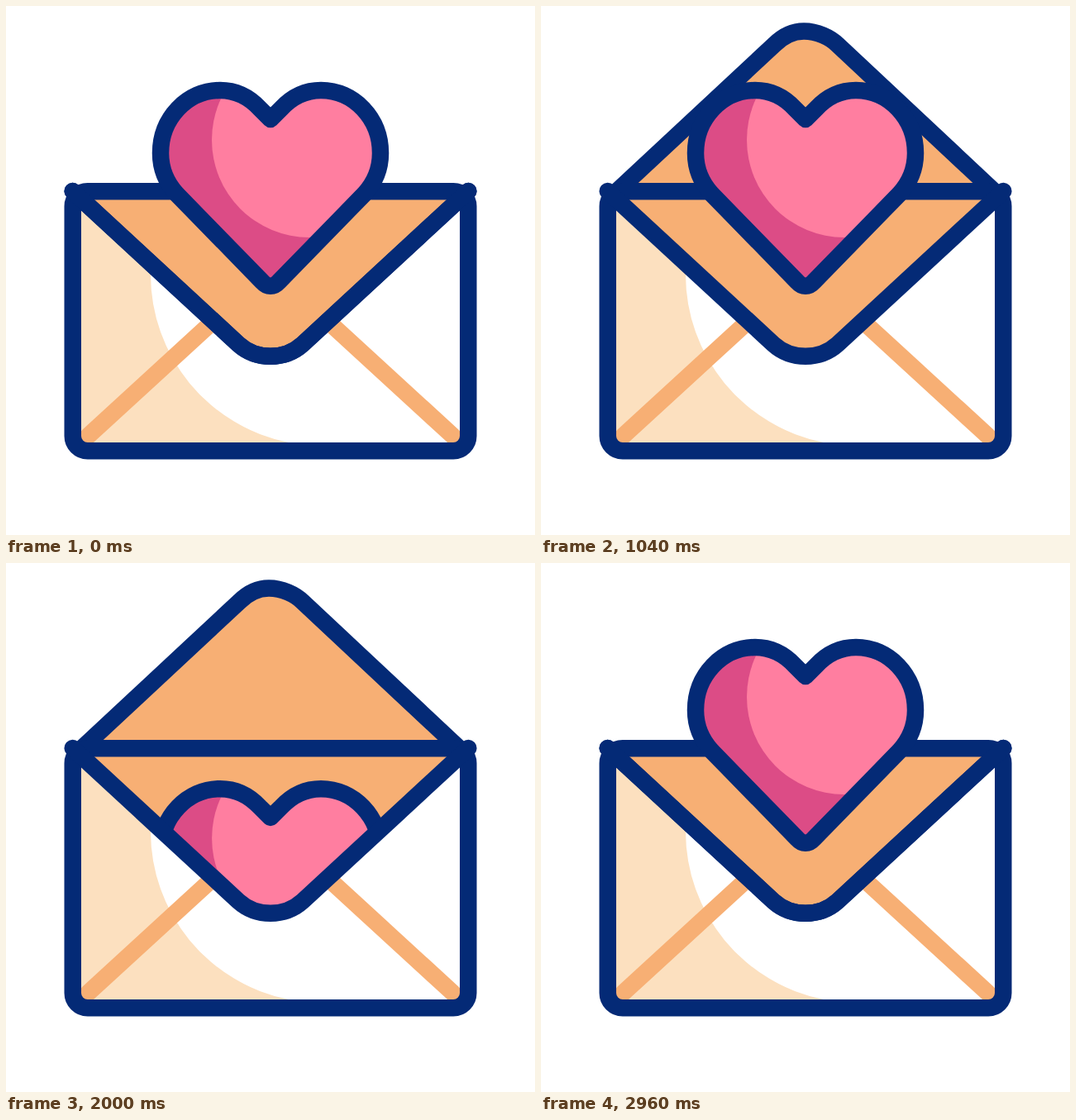
An HTML page for the animation above (3 s loop, 640 px wide and 640 px high).

```html
<!DOCTYPE html>
<html lang="en">
<head>
<meta charset="utf-8">
<title>Love letter</title>
<style>
  html, body { margin: 0; width: 100%; height: 100%; overflow: hidden; background: #fff; }
  svg { display: block; width: 100vw; height: 100vh; }

  .line { fill: none; stroke: #042a76; stroke-width: 20.5; stroke-linecap: round; stroke-linejoin: round; }
  .orange { fill: #f7af74; }
  .fold { fill: none; stroke: #f7af74; stroke-width: 20.5; stroke-linecap: round; }

  .flap { fill: #f7af74; animation: flap 3s infinite ease-in-out; }
  .heart {
    transform-box: view-box;
    transform-origin: 320px 220px;
    animation: drop 3s infinite ease-in-out, tilt 3s infinite ease-in-out, beat 3s infinite ease-in-out;
  }

  @keyframes flap {
    0%, 13.333%, 98.667%, 100% {
      d: path("M80.7 224 L281 409 C292 419 306 423.8 320 423.8 C334 423.8 348 419 359 409 L559.3 224");
    }
    28.8% {
      d: path("M92 224 L282 43 C292 33 304 27 318 27 C334 27 350 34.5 359 43 L548 224");
    }
    33.333%, 88% {
      d: path("M92 224 L282 47 C292 37 304 30.5 318 30.5 C334 30.5 350 38 359 47 L548 224");
    }
  }
  @keyframes drop {
    0%, 35.7% { translate: 0 0; }
    56%, 77.333% { translate: 0 171px; }
    86.333%, 100% { translate: 0 0; }
  }
  @keyframes tilt {
    0%, 36% { rotate: 0deg; }
    44% { rotate: -8.6deg; }
    56%, 100% { rotate: 0deg; }
  }
  @keyframes beat {
    0%, 6.667% { scale: 1; }
    12.667% { scale: 1.045; }
    18.667%, 52% { scale: 1; }
    57.333% { scale: .955; }
    68%, 100% { scale: 1; }
  }
</style>
</head>
<body>
<svg viewBox="0 0 640 640">
  <defs>
    <path id="vee" d="M80.7 224 L281 409 C292 419 306 423.8 320 423.8 C334 423.8 348 419 359 409 L559.3 224"/>
    <path id="shape" d="M320 137 L307 124 C294 110 277 102 259 102 C219 102 187 136 187 178
      C187 197 194 214 207 228 L310.4 334 C313 337 316 338.7 320 338.7 C324 338.7 327 337 329.6 334
      L433 228 C446 214 453 197 453 178 C453 136 421 102 381 102 C363 102 346 110 333 124 Z"/>
    <clipPath id="heartClip"><use href="#shape"/></clipPath>
    <!-- everything above the pocket edge -->
    <clipPath id="pocketClip">
      <path d="M0 0 V224 H80.7 L281 409 C292 419 306 423.8 320 423.8 C334 423.8 348 419 359 409 L559.3 224 H640 V0 Z"/>
    </clipPath>
  </defs>

  <rect x="80.75" y="224.25" width="478.5" height="314" rx="18" fill="#fff"/>
  <path d="M84 228 H175 V325 A207 207 0 0 0 342 528 L360 538 H99 Q81 538 81 520 Z" fill="#fce0bf"/>
  <path class="fold" d="M99 520.5 L250 382 M541 520.5 L390 382"/>
  <use href="#vee" class="orange"/>

  <path class="flap line" style="fill:#f7af74" d="M80.7 224 L281 409 C292 419 306 423.8 320 423.8 C334 423.8 348 419 359 409 L559.3 224"/>
  <rect class="line" x="80.75" y="224.25" width="478.5" height="314" rx="18"/>

  <g clip-path="url(#pocketClip)">
    <g class="heart">
      <use href="#shape" fill="#dc4c86"/>
      <circle cx="367" cy="162" r="118" fill="#ff7ea0" clip-path="url(#heartClip)"/>
      <use href="#shape" class="line"/>
    </g>
  </g>
  <use href="#vee" class="line"/>
</svg>
</body>
</html>
```
